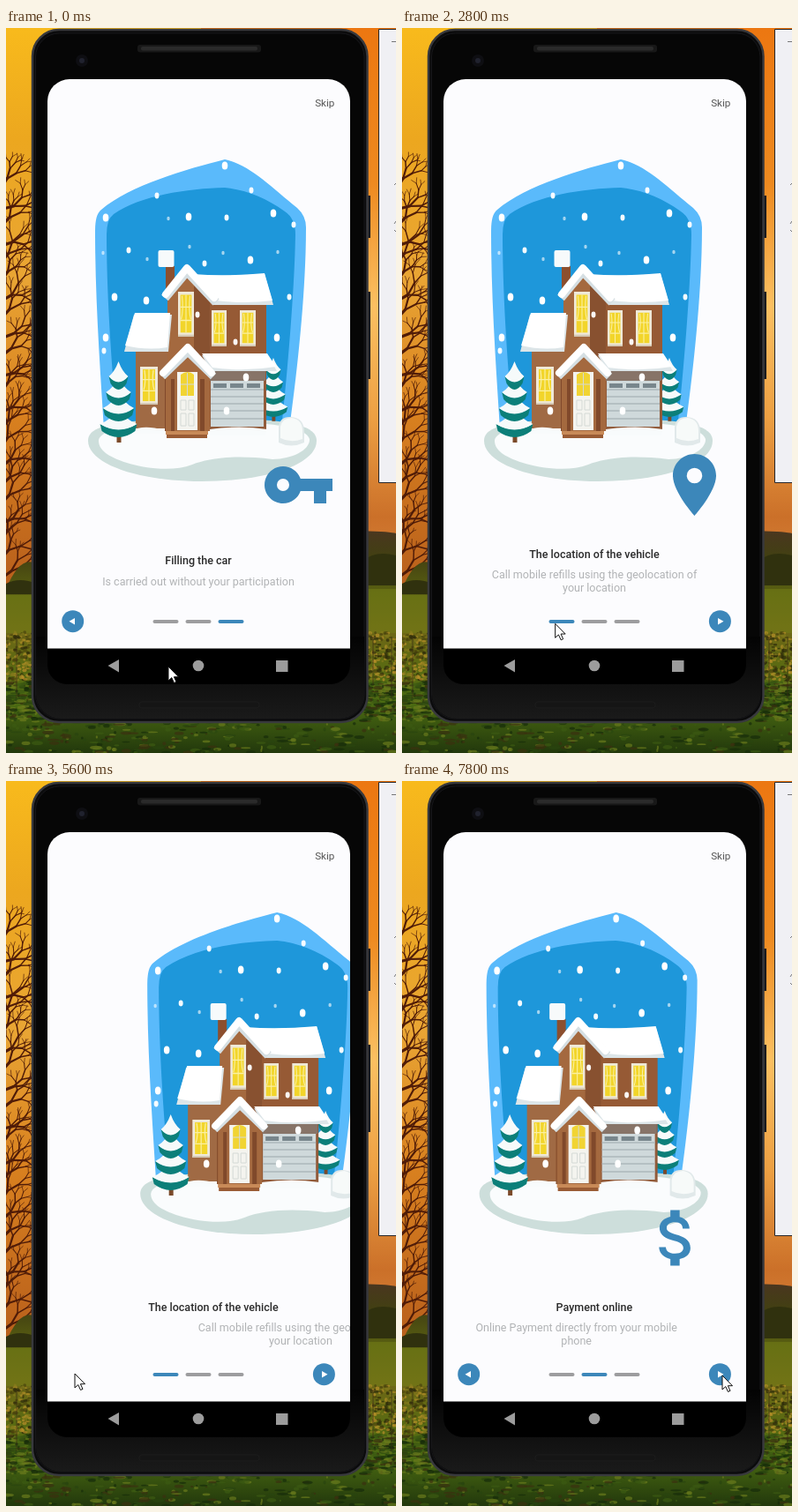
An HTML page for the animation above (8000 ms loop, 442x822 px).

```html
<!DOCTYPE html>
<html lang="en">
<head>
<meta charset="utf-8">
<title>Onboarding preview</title>
<style>
  html, body { margin: 0; width: 100%; height: 100%; overflow: hidden; background: #000; }
  svg { display: block; width: 100vw; height: 100vh; }
  text { font-family: Roboto, "Open Sans", sans-serif; font-size: 12.5px; text-anchor: middle; }
</style>
</head>
<body>
<svg viewBox="0 0 442 822" xmlns="http://www.w3.org/2000/svg">
  <defs>
    <linearGradient id="sunLeft" x1="0" y1="0" x2="0" y2="1">
      <stop offset="0" stop-color="#f8ba1c"/>
      <stop offset=".2" stop-color="#eca71f"/>
      <stop offset=".45" stop-color="#e9a534"/>
      <stop offset=".7" stop-color="#d8801f"/>
      <stop offset="1" stop-color="#b9601c"/>
    </linearGradient>
    <linearGradient id="sunRight" x1="0" y1="0" x2="0" y2="1">
      <stop offset="0" stop-color="#ec7711"/>
      <stop offset=".28" stop-color="#ee8a20"/>
      <stop offset=".5" stop-color="#fbc062"/>
      <stop offset=".7" stop-color="#eda043"/>
      <stop offset=".88" stop-color="#cb7029"/>
      <stop offset="1" stop-color="#d9863c"/>
    </linearGradient>
    <linearGradient id="field" x1="0" y1="0" x2="0" y2="1">
      <stop offset="0" stop-color="#4a3620"/>
      <stop offset=".12" stop-color="#424012"/>
      <stop offset=".28" stop-color="#5a6011"/>
      <stop offset=".45" stop-color="#6f6716"/>
      <stop offset=".62" stop-color="#5a6a12"/>
      <stop offset=".78" stop-color="#4a6a12"/>
      <stop offset="1" stop-color="#22380c"/>
    </linearGradient>
    <linearGradient id="chin" x1="0" y1="0" x2="0" y2="1">
      <stop offset="0" stop-color="#030303"/>
      <stop offset="1" stop-color="#1a1a1a"/>
    </linearGradient>
    <clipPath id="screen"><path d="M47 703.500V83a25 25 0 0 1 25-25H365a25 25 0 0 1 25 25V703.500Z"/></clipPath>
    <symbol id="window" viewBox="0 0 20 44" preserveAspectRatio="none">
      <path fill="#efe9d8" d="M0 0H20V44H0Z"/>
      <path fill="#f2d52a" d="M3 3H17V40H3Z"/>
      <path fill="none" stroke="#fbf0a0" stroke-width="1.200" d="M10 3V40M3 15H17M3 28H17M5 4Q7 18 4 27M15 4Q13 18 16 27"/>
      <path fill="#d5c9b5" d="M0 42H20V44H0Z"/>
    </symbol>
    <g id="fir"></g>
  </defs>

  <rect width="221" height="630" fill="url(#sunLeft)"/>
  <rect x="221" width="221" height="630" fill="url(#sunRight)"/>
  <g id="scenery"></g>

  <!-- window behind the phone -->
  <path fill="#f0f0f4" stroke="#26262a" d="M450 1.500H422.500V515.500H450Z"/>
  <path stroke="#777" d="M437 15.500H442M440 178L442 176M440 222L442 219M440 229L442 231" fill="none"/>

  <!-- phone -->
  <path fill="#1b1b1d" d="M408 190h5v48h-5zM408 299h5v99h-5z"/>
  <rect x="30" y="2" width="379.500" height="785" rx="30" fill="#0b0b0c" stroke="#38393d" stroke-width="2.500"/>
  <rect x="33.500" y="6" width="372.500" height="777" rx="27" fill="#060606" stroke="#17171a"/>
  <path fill="url(#chin)" d="M34 690H406V755a28 28 0 0 1-28 28H62a28 28 0 0 1-28-28Z"/>
  <path fill="#000" d="M47 700H390V722a22 22 0 0 1-22 22H69a22 22 0 0 1-22-22Z"/>
  <rect x="149" y="19" width="140" height="8.500" rx="3" fill="#181818"/>
  <rect x="153" y="21" width="132" height="4.500" rx="2" fill="#2a2a2a"/>
  <rect x="151" y="764" width="136" height="7" rx="3" fill="#151515" stroke="#1c1c1c"/>
  <circle cx="86" cy="37" r="7" fill="#0e0e12"/>
  <circle cx="86" cy="37" r="3" fill="#20222e"/>
  <g fill="#9c9c9c">
    <path d="M115.500 723L128 716V730.500Z"/><circle cx="218" cy="723" r="6.300"/><path d="M306 717h13.500v13h-13.500z"/>
  </g>

  <g clip-path="url(#screen)">
    <rect x="47" y="58" width="343" height="646" fill="#fcfcfe"/>
    <text x="361.300" y="88.500" fill="#555" style="font-size:11.700px">Skip</text>

    <g id="image">
      <path fill="#5abafb" d="M248 149C205 160 141 178 108 206Q101 211 101 230C101 310 107 390 112 470L321 455C330 390 340 300 340 226Q340 213 330 204C300 180 276 155 248 149Z"/>
      <path fill="#1e97da" d="M248 181C205 182 152 190 122 211Q114 217 114 234C114 310 121 400 127 462L312 455C318 400 327 300 328 234Q328 216 316 208C294 192 270 183 248 181Z"/>
      <path fill="#cddedb" d="M93 468C93 450 125 444 222 443S352 450 352 468C352 495 295 514 222 514S93 494 93 468Z"/>
      <path fill="#fafcfd" d="M105 468C107 452 160 446 222 446S340 450 344 466C345 478 325 489 302 489C262 484 231 487 211 495C190 503 160 500 137 493C115 486 105 478 105 468Z"/>
      <use href="#fir" transform="translate(303 374) scale(.78)"/>

      <path fill="#8c4f2e" d="M181 270h10v30h-10z"/>
      <rect x="172.500" y="252" width="18" height="19" rx="2" fill="#f7fafb"/>
      <path fill="#a06a44" d="M147 362H185V454H147Z"/>
      <path fill="#965a35" d="M230 308H295V372H230Z"/>
      <path fill="#a4693f" d="M183 298L205 276L231 304V380H183Z"/>
      <path fill="#885130" d="M213 292L231 308V380H213Z"/>
      <path fill="#925b3a" d="M226 386H295V456H226Z"/>
      <path fill="#877468" d="M226 388H294V400H226Z"/>
      <path fill="#cfd9db" d="M232 400H292V452H232Z"/>
      <path stroke="#adb9bc" stroke-width="1.300" d="M232 410H292M232 418H292M232 426H292M232 434H292M232 443H292"/>
      <path fill="#78868c" d="M235 403h15v5h-15zM254 403h15v5h-15zM273 403h15v5h-15z"/>
      <path fill="#dce5e8" d="M145 325H188L184 367H134Z"/>
      <path fill="#fff" d="M146 323H186L183 362Q160 366 135 360Z"/>
      <path fill="#dce5e8" d="M216 282L293 279L303 314H235Z"/>
      <path fill="#fff" d="M212 279Q250 282 293 278L302 309Q270 313 238 309Z"/>
      <path fill="#dce5e8" d="M222 371L296 370L307 389H232Z"/>
      <path fill="#fff" d="M222 369H296L306 384Q270 390 234 385Z"/>
      <path fill="none" stroke="#d5dfe3" stroke-width="10" d="M180 306L205 276L238 311"/>
      <path fill="none" stroke="#fff" stroke-width="8" stroke-linecap="round" stroke-linejoin="round" d="M181 302L205 272L236 306"/>
      <path fill="#a4693f" d="M180 394L206 368L231 394V457H180Z"/>
      <path fill="#80492b" d="M180 398h11v59h-11zM220 398h11v59h-11z"/>
      <path fill="#a4693f" d="M181 398h6v59h-6zM225 398h6v59h-6z"/>
      <path fill="none" stroke="#d5dfe3" stroke-width="9" d="M177 395L206 367L235 395"/>
      <path fill="none" stroke="#fff" stroke-width="8" stroke-linecap="round" stroke-linejoin="round" d="M178 391L206 362L233 391"/>
      <use href="#window" x="195" y="299" width="18" height="51"/>
      <use href="#window" x="233" y="320" width="17" height="41"/>
      <use href="#window" x="265" y="320" width="18" height="41"/>
      <use href="#window" x="152" y="384" width="20" height="43"/>
      <path fill="#f4f4ef" d="M194 390H217V456H194Z"/>
      <path fill="#f1d433" d="M198 393Q206 387 213 393V417H198Z"/>
      <path fill="none" stroke="#d4d9d5" d="M205.500 391V417M198 404H213M198 422h6v11h-6zM207 422h6v11h-6zM198 437h6v14h-6zM207 437h6v14h-6z"/>
      <path fill="#c88a58" d="M181 457H229V461H181Z"/>
      <path fill="#9a5c35" d="M182 461H228V465H182Z"/>
      <path fill="#f8fbfc" d="M142 457Q155 449 179 456L178 460H145ZM231 455Q265 450 296 455L294 462H231Z"/>
      <path fill="#e1e9ea" d="M309 470V453Q310 440 323 441Q338 442 338 458V470Q323 477 309 470Z"/>
      <path fill="#f7faf9" d="M311 465V452Q313 442 324 442Q336 444 336 457V466Q323 471 311 465Z"/>
      <use href="#fir" transform="translate(127.500 378)"/>
      <g id="flakes" fill="#fff"></g>
    </g>

    <path id="icon" fill="#3c87ba" fill-rule="evenodd"/>
    <text id="title" fill="#2a2a2a" font-weight="500"></text>
    <g id="description" fill="#b1b3b5"><text></text><text></text></g>

    <g id="bars"></g>
    <g id="prev"><circle cx="75.700" cy="672.700" r="12.500" fill="#3c87ba"/><path fill="#fff" d="M71.500 672.700L78 669V676.500Z"/></g>
    <g id="next"><circle cx="360.400" cy="672.700" r="12.500" fill="#3c87ba"/><path fill="#fff" d="M364.500 672.700L358 669V676.500Z"/></g>
  </g>

  <path id="cursor" fill="#fff" stroke="#111" stroke-width="1" d="M0 0V16L3.800 12.600L6.500 18.500L9 17.400L6.400 11.700H11.500Z"/>
</svg>

<script>
const LOOP = 8000, STEP = 200, WIDTH = 343;
const $ = id => document.getElementById(id);
const clamp = v => Math.min(1, Math.max(0, v));

const pages = [
  { title: "The location of the vehicle", top: 600.5,
    lines: ["Call mobile refills using the geolocation of", "your location"],
    icon: "M12 2C8.13 2 5 5.13 5 9c0 5.250 7 13 7 13s7-7.750 7-13c0-3.870-3.130-7-7-7zm0 9.500a2.500 2.500 0 1 1 0-5 2.500 2.500 0 0 1 0 5z" },
  { title: "Payment online", top: 600.5,
    lines: ["Online Payment directly from your mobile", "phone"],
    icon: "M11.800 10.900c-2.270-.590-3-1.200-3-2.150 0-1.090 1.010-1.850 2.700-1.850 1.780 0 2.440.850 2.500 2.100h2.210c-.070-1.720-1.120-3.300-3.210-3.810V3h-3v2.160c-1.940.420-3.500 1.680-3.500 3.610 0 2.310 1.910 3.460 4.700 4.130 2.500.600 3 1.480 3 2.410 0 .690-.490 1.790-2.700 1.790-2.060 0-2.870-.920-2.980-2.100h-2.200c.120 2.190 1.760 3.420 3.680 3.830V21h3v-2.150c1.950-.370 3.500-1.500 3.500-3.550 0-2.840-2.430-3.810-4.700-4.400z" },
  { title: "Filling the car", top: 608,
    lines: ["Is carried out without your participation", ""],
    icon: "M12.650 10C11.830 7.670 9.610 6 7 6c-3.310 0-6 2.690-6 6s2.690 6 6 6c2.610 0 4.830-1.670 5.650-4H17v4h4v-4h2v-4H12.650zM7 14a2 2 0 1 1 0-4 2 2 0 0 1 0 4z" }
];

// Leaving and entering content uses the same side: right for back, left for next.
const clicks = [
  { at: 560, from: 2, to: 1 },
  { at: 1740, from: 1, to: 0 },
  { at: 3560, from: 0, to: 1 },
  { at: 5160, from: 1, to: 0 },
  { at: 7268, from: 0, to: 1 }
];
const SWAP = 225, ENTER = 300;
const parts = {
  title: { leave: 50, settle: 550 },
  image: { leave: 25, settle: 607 },
  description: { leave: 0, settle: 649 },
  icon: { leave: 0, settle: 649 }
};

const cursorPath = [
  [0, 184, 724], [500, 77, 674], [2500, 77, 674], [3400, 367, 678], [4300, 367, 678],
  [5000, 83, 671], [5100, 78, 672], [5800, 78, 672], [6400, 361, 694], [6800, 363, 674], [8000, 363, 674]
];

function random(seed) {
  return () => (seed = (seed * 16807) % 2147483647) / 2147483647;
}

function drawScenery() {
  const rnd = random(77);
  const pick = list => list[Math.floor(rnd() * list.length)];
  let out = "";
  const branch = (x, y, angle, length, width) => {
    const x2 = x + Math.cos(angle) * length, y2 = y + Math.sin(angle) * length;
    out += `<path d="M${x} ${y}L${x2} ${y2}" stroke="#501c08" stroke-width="${width}" stroke-linecap="round"/>`;
    if (width < 0.9) return;
    for (const turn of [-0.45, 0.4]) {
      branch(x2, y2, angle + turn * (0.5 + rnd()), length * (0.65 + rnd() * 0.25), width * 0.68);
    }
  };
  for (let y = 185; y < 640; y += 21) branch(-8, y, -1 + rnd() * 0.9, 17, 3.2);
  out += `<path d="M0 636Q15 600 31 606V572Q422 566 442 573V822H0Z" fill="url(#field)"/>`;
  out += `<path d="M405 604Q418 592 442 598V632H405ZM0 630Q15 622 35 630V642H0Z" fill="#30310e"/>`;
  out += `<path d="M0 643H35V686H0ZM405 636H442V686H405Z" fill="#737e17" opacity=".55"/>`;
  for (let i = 0; i < 1100; i++) {
    const y = 685 + rnd() * 137, low = y > 742;
    const x = y > 785 || rnd() < 0.3 ? rnd() * 442 : pick([0, 408]) + rnd() * 34;
    const color = pick(low ? ["#172c0a", "#3c5a12", "#6a7a1c", "#2a4410", "#3a3010"] : ["#2c290a", "#b8902a", "#857a1c", "#4a430d"]);
    out += `<ellipse cx="${x}" cy="${y}" rx="${1 + rnd() * (low ? 6 : 2)}" ry="${0.8 + rnd() * 1.6}" fill="${color}" opacity=".7"/>`;
  }
  out += `<path d="M12 760V690M437 760V690M416 745V690" stroke="#3a2c14" opacity=".7"/>`;
  $("scenery").innerHTML = out;
}

function drawFir() {
  let out = `<path fill="#7b4a2a" d="M-2 76h5v16h-5z"/>`;
  for (let i = 3; i >= 0; i--) {
    const y = 17 + i * 18, w = 11 + i * 3.3;
    out += `<path fill="#0c7f79" d="M${-w} ${y}Q0 ${y + 12} ${w} ${y}L${w - 2} ${y + 8}Q0 ${y + 22} ${2 - w} ${y + 8}Z"/>`
         + `<path fill="#f6fafa" d="M0 ${y - 17}Q${w * 0.4} ${y - 5} ${w} ${y}Q0 ${y + 13} ${-w} ${y}Q${-w * 0.4} ${y - 5} 0 ${y - 17}Z"/>`;
  }
  $("fir").innerHTML = out;
}

function drawFlakes() {
  const large = [[248, 156], [113, 215], [207, 214], [303, 210], [277, 263], [159, 309], [123, 305], [113, 351], [307, 351], [272, 396], [168, 434], [250, 434]];
  const small = [[171, 190], [278, 184], [326, 223], [250, 215], [139, 252], [225, 267], [321, 305], [260, 356], [217, 325], [111, 366]];
  const tiny = [[184, 216], [208, 248], [246, 255], [308, 254], [110, 255], [160, 262]];
  const dots = (list, rx, ry, alpha) => list.map(([x, y]) =>
    `<ellipse cx="${x}" cy="${y}" rx="${rx}" ry="${ry}" opacity="${alpha}"/>`).join("");
  $("flakes").innerHTML = dots(large, 3.3, 4.6, 1) + dots(small, 2.5, 3.4, 0.95) + dots(tiny, 1.7, 2.3, 0.6);
}

function drawBars() {
  $("bars").innerHTML = pages.map((_, i) =>
    `<rect x="${166.5 + i * 37}" y="671" width="29" height="4" rx="2"/>`).join("");
}

function showPage(index) {
  const page = pages[index];
  const title = $("title"), lines = $("description").children;
  title.textContent = page.title;
  title.setAttribute("x", 218);
  title.setAttribute("y", page.top);
  page.lines.forEach((line, i) => {
    lines[i].textContent = line;
    lines[i].setAttribute("x", 218);
    lines[i].setAttribute("y", page.top + 23.5 + i * 15);
  });
  $("icon").setAttribute("d", page.icon);
  [...$("bars").children].forEach((bar, i) => bar.setAttribute("fill", i === index ? "#3c87ba" : "#9d9d9f"));
  $("prev").style.display = index > 0 ? "" : "none";
  $("next").style.display = index < 2 ? "" : "none";
}

function offsetAt(part, age) {
  if (age < SWAP) return WIDTH * clamp((age - part.leave) / (SWAP - 50)) ** 2;
  return WIDTH * clamp((part.settle - age) / ENTER) ** 3;
}

function cursorAt(t) {
  const i = Math.max(1, cursorPath.findIndex(key => key[0] >= t));
  const [t0, x0, y0] = cursorPath[i - 1], [t1, x1, y1] = cursorPath[i];
  const k = (t - t0) / (t1 - t0);
  return [x0 + (x1 - x0) * k, y0 + (y1 - y0) * k];
}

function render(t) {
  const click = clicks.filter(c => c.at <= t).pop();
  const age = click ? t - click.at : 0;
  const side = click && click.to < click.from ? 1 : -1;
  showPage(click ? (age < SWAP ? click.from : click.to) : 2);
  for (const [id, part] of Object.entries(parts)) {
    const dx = click ? side * offsetAt(part, age) : 0;
    $(id).setAttribute("transform", id === "icon"
      ? `translate(${289.5 + dx} 476) scale(3.5)` : `translate(${dx} 0)`);
  }
  $("cursor").setAttribute("transform", `translate(${cursorAt(t)})`);
}

drawScenery();
drawFir();
drawFlakes();
drawBars();

const start = performance.now();
function tick() {
  const t = (performance.now() - start) % LOOP;
  render(Math.floor(t / STEP) * STEP);
  requestAnimationFrame(tick);
}
tick();
</script>
</body>
</html>
```
